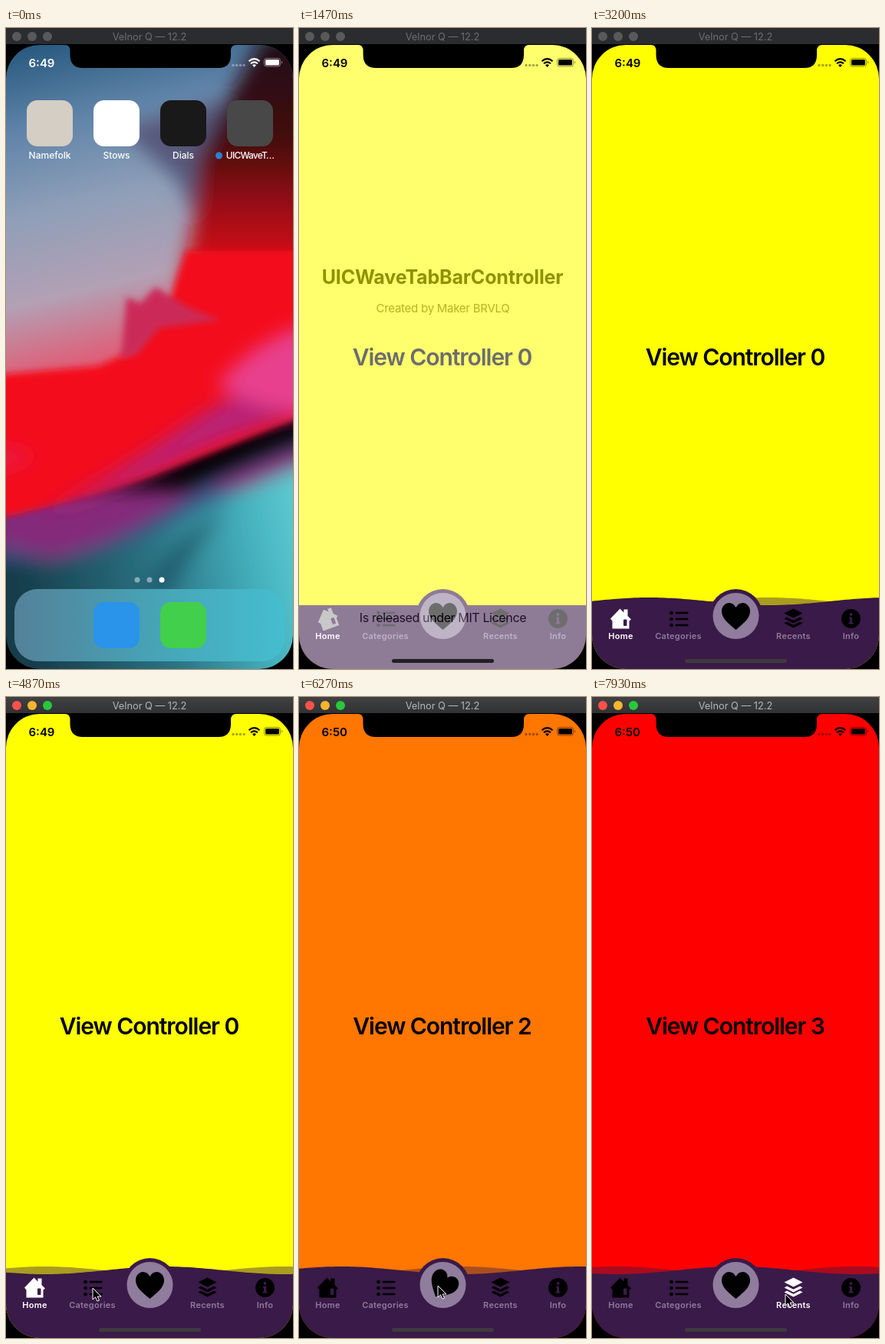
Recreate the animation shown at these times as an HTML page. Size 374x834 px, loop 8 s.

```html
<!DOCTYPE html>
<html lang="en">
<head>
<meta charset="utf-8">
<title>Wave tab bar</title>
<style>
html, body { margin: 0; width: 100%; height: 100%; overflow: hidden; background: #000; }
svg { display: block; width: 100%; height: 100%; }
text { font-family: Inter, "Open Sans", sans-serif; }
.mid { text-anchor: middle; }
.label { font-size: 12px; font-weight: 500; fill: #fff; }
.tab { font-size: 11px; font-weight: 600; letter-spacing: .25px; }
</style>
</head>
<body>
<svg viewBox="0 0 374 834">
  <defs>
    <clipPath id="screen"><path d="M0 66A44 44 0 0 1 44 22H77Q83.500 22 83.500 30V35Q83.500 52 100 52H277Q293 52 293 35V30Q293 22 300 22H330A44 44 0 0 1 374 66V790A44 44 0 0 1 330 834H44A44 44 0 0 1 0 790Z"/></clipPath>
    <clipPath id="window"><rect id="frame"/></clipPath>
    <filter id="soft" x="-20%" y="-20%" width="140%" height="140%"><feGaussianBlur stdDeviation="12"/></filter>
    <filter id="crisp" x="-20%" y="-20%" width="140%" height="140%"><feGaussianBlur stdDeviation="4"/></filter>
    <linearGradient id="sky" x2=".2" y2="1">
      <stop stop-color="#24567c"/><stop offset=".25" stop-color="#5f83a8"/><stop offset=".5" stop-color="#8f9fb8"/>
      <stop offset=".75" stop-color="#b3a0b4"/><stop offset="1" stop-color="#e8506a"/>
    </linearGradient>
    <linearGradient id="ridge" x2="0" y2="1">
      <stop stop-color="#1d0c16"/><stop offset=".4" stop-color="#43080f"/><stop offset=".7" stop-color="#a50a14"/><stop offset="1" stop-color="#f4101a"/>
    </linearGradient>
    <linearGradient id="sea" x2="1" y2="-.15">
      <stop stop-color="#163c4a"/><stop offset=".45" stop-color="#2c7686"/><stop offset=".75" stop-color="#46b4c0"/><stop offset="1" stop-color="#6cd6da"/>
    </linearGradient>
    <linearGradient id="dock"><stop stop-color="#54819a"/><stop offset=".5" stop-color="#46a3b5"/><stop offset="1" stop-color="#45bed0"/></linearGradient>
    <linearGradient id="lit" x2="0" y2="1"><stop stop-color="#404143"/><stop offset="1" stop-color="#313234"/></linearGradient>
  </defs>

  <rect id="bar" width="374" height="21"/>
  <g id="lights"><circle cx="14" cy="11" r="6"/><circle cx="34" cy="11" r="6"/><circle cx="54" cy="11" r="6"/></g>
  <text id="caption" class="mid" x="187" y="15.5" font-size="12.8">Velnor Q — 12.2</text>

  <g clip-path="url(#screen)">
    <g id="home">
      <rect y="22" width="374" height="440" fill="url(#sky)"/>
      <g filter="url(#soft)">
        <path d="M150 130L300 90L290 230L245 245L225 200Z" fill="#57587c"/>
        <path d="M400 10H335L285 100L250 170L245 250L225 345H400Z" fill="url(#ridge)"/>
        <path d="M-20 655Q120 650 230 600T400 530V860H-20Z" fill="#2f4f80"/>
        <path d="M-20 600H400V540Q300 570 220 620T60 690L-20 670Z" fill="#84297a"/>
        <path d="M-20 690Q90 705 190 655T400 565V860H-20Z" fill="url(#sea)"/>
        <path d="M290 625Q220 660 170 740H215Q240 680 290 625Z" fill="#235f72"/>
      </g>
      <g filter="url(#crisp)">
        <path d="M400 290L235 290L215 350L165 420L120 440L-20 452V640Q120 610 210 575T400 500Z" fill="#f3101a"/>
      </g>
      <g filter="url(#soft)">
        <path d="M400 500Q300 525 220 565T40 635Q130 590 230 520T400 460Z" fill="#b82277"/>
        <path d="M400 385Q330 400 275 465Q330 500 400 500Z" fill="#e8418d"/>
        <path d="M-20 545L45 555L-20 580Z" fill="#e81f48"/>
      </g>
      <path filter="url(#crisp)" d="M150 430L157 350L175 358L195 337L240 365L280 380L200 390L170 425Z" fill="#cb2b58"/>
      <g id="icons">
        <rect x="11" y="730" width="352" height="94" rx="30" fill="url(#dock)"/>
        <circle cx="171" cy="718" r="3.5" fill="#fff" opacity=".45"/>
        <circle cx="187" cy="718" r="3.5" fill="#fff" opacity=".45"/>
        <circle cx="203" cy="718" r="3.5" fill="#fff"/>
        <circle cx="277.500" cy="166" r="4.5" fill="#2d7fd2"/>
      </g>
    </g>

    <g id="app">
      <rect id="page" width="374" height="834"/>
      <text id="heading" class="mid" x="186.500" y="438.500" font-size="30" font-weight="600" letter-spacing="-1.05"></text>
      <path id="backWave" fill="#3a1a48" opacity=".43"/>
      <path id="frontWave" fill="#3a1a48"/>
      <circle cx="187.500" cy="765" r="35" fill="#3a1a48"/>
      <circle cx="187.500" cy="765" r="30" fill="#907c9c"/>
      <g id="tabs"></g>
      <rect x="121" y="821" width="133" height="5" rx="2.500" fill="#3d3a3e"/>
    </g>

    <g id="launch" clip-path="url(#window)">
      <g id="splash">
        <rect y="22" width="374" height="812" fill="#fff"/>
        <text class="mid" x="187" y="333" font-size="25" font-weight="700" letter-spacing="-.15">UICWaveTabBarController</text>
        <text class="mid" x="187.500" y="370.500" font-size="15" letter-spacing="-.25" fill="#555">Created by Maker BRVLQ</text>
        <text class="mid" x="187.500" y="773" font-size="16" letter-spacing="-.37">Is released under MIT Licence</text>
        <rect x="121" y="821" width="133" height="5" rx="2.500"/>
      </g>
    </g>

    <g id="status" fill="currentColor">
      <text id="clock" x="29.500" y="50.500" font-size="15" font-weight="600"></text>
      <g opacity=".35"><circle cx="296" cy="48.500" r="1.700"/><circle cx="300.700" cy="48.500" r="1.700"/><circle cx="305.400" cy="48.500" r="1.700"/><circle cx="310.100" cy="48.500" r="1.700"/></g>
      <g fill="none" stroke="currentColor" stroke-width="2.200"><path d="M316.500 43.200Q323.500 37 330.500 43.200"/><path d="M319 46.300Q323.500 42.300 328 46.300"/></g>
      <path d="M321 48.300Q323.500 46.300 326 48.300L323.500 51Z"/>
      <rect x="336.500" y="39.500" width="21" height="10.500" rx="3" fill="none" stroke="currentColor" opacity=".45"/>
      <rect x="338" y="41" width="18" height="7.500" rx="1.600"/>
      <path d="M359 43Q361.500 44.700 359 46.500Z" opacity=".5"/>
    </g>
  </g>
  <path id="cursor" d="M0 0V15L3.500 11.800L6 17.200L8.500 16L6.200 11H11Z" fill="#000" stroke="#fff" stroke-width="1"/>
</svg>

<script>
const LOOP = 8000, SPIN = 550, TAU = Math.PI * 2;
const $ = id => document.getElementById(id);
const set = (el, attrs) => { for (const k in attrs) el.setAttribute(k, attrs[k]); };
const clamp = v => Math.max(0, Math.min(1, v));
const smooth = v => { v = clamp(v); return v * v * (3 - 2 * v); };
const mix = (a, b, p) => a + (b - a) * p;

const tile = (x, y, fill) => `<rect x="${x - 30}" y="${y - 30}" width="60" height="60" rx="14" fill="${fill}"/>`;
const apps = [[57, 'Namefolk', '#d4cec4'], [144, 'Stows', '#fff'], [231, 'Dials', '#19191a'], [318, 'UICWaveT…', '#484848']];
$('icons').innerHTML += apps.map(([x, name, fill], i) => tile(x, 124, fill) +
  `<text class="mid label" x="${x}" y="170.300"${i === 3 ? ' letter-spacing="-.8"' : ''}>${name}</text>`).join('') +
  tile(144, 777, '#2a93ea') + tile(231, 777, '#42cf4c');

const rows = [-7.5, .5, 8.5].map(y => `<circle cx="-9" cy="${y}" r="2.300"/><rect x="-4" y="${y - 1.2}" width="17" height="2.400" rx="1"/>`).join('');
const layers = '<path d="M0 -13L12 -7L0 -1L-12 -7Z"/>' +
  [0, 6].map(y => `<path d="M-12 ${y}L-8.500 ${y - 2}L0 ${y + 2.2}L8.500 ${y - 2}L12 ${y}L0 ${y + 6}Z"/>`).join('');
const tabs = [
  { x: 37.5, name: 'Home', start: 1000, end: 5150, art: '<path d="M-13.500 0L-1 -13L4 -8V-12H9V-3.500L13.500 1L11 3V13H-11V3Z"/><rect x="3.500" y="1" width="4.500" height="8.500" rx="1" fill="#3a1a48"/>' },
  { x: 112.5, name: 'Categories', start: 5150, end: 6170, art: rows },
  { x: 187.5, y: 765, name: '', start: 6170, end: 7330, art: '<path d="M0 18C-8 11 -18.500 4 -18.500 -6C-18.500 -13 -13.500 -17 -9 -17C-5 -17 -2 -15 0 -11C2 -15 5 -17 9 -17C13.500 -17 18.500 -13 18.500 -6C18.500 4 8 11 0 18Z"/>' },
  { x: 262.5, name: 'Recents', start: 7330, end: LOOP, art: layers },
  { x: 337.5, name: 'Info', start: LOOP, end: LOOP, art: '<circle r="12.500"/><circle cy="-5.500" r="1.900" fill="#3a1a48"/><path d="M-2.500 -2H1.500V5H3V7H-3V5H-1.500V0H-2.500Z" fill="#3a1a48"/>' }
];
$('tabs').innerHTML = tabs.map(t => `<g>${t.art}</g><text class="mid tab" x="${t.x}" y="795">${t.name}</text>`).join('');
tabs.forEach((t, i) => { t.icon = $('tabs').children[i * 2]; t.text = $('tabs').children[i * 2 + 1]; });
const pageColors = ['#ff0', '#0f0', '#ff7600', '#f00'];

// time, x, y
const pointer = [[4730, 132, 742], [4870, 113, 769], [5550, 113, 769], [6000, 181, 766], [6750, 181, 766], [7250, 252, 777], [LOOP, 252, 777]];

function wave(t, sign) {
  const level = smooth((t - 1650) / 350) * 5, crest = 75 - (t - 3200) * .108;
  let d = 'M0 834';
  for (let x = 0; x <= 376; x += 4)
    d += `L${x} ${(751 - level - sign * level * Math.cos((x - crest) * TAU / 312)).toFixed(2)}`;
  return d + 'V834Z';
}

function drawLaunch(t) {
  const k = Math.max(0, t - 80) * .0142, p = 1 - (1 + k) * Math.exp(-k);
  const x = mix(288, 0, p), y = mix(94, 22, p), w = mix(60, 374, p), h = mix(60, 812, p);
  const s = w / 374, cx = x + w / 2, cy = y + h / 2, grow = w / 60;
  set($('frame'), { x, y, width: w, height: h, rx: mix(14, 44, p) });
  set($('splash'), { transform: `translate(${cx} ${cy}) scale(${s}) translate(-187 -428)` });
  set($('icons'), { transform: `translate(${cx} ${cy}) scale(${grow}) translate(-318 -124)`, opacity: 1 - clamp(p / .6) });
  set($('home'), { opacity: mix(1, .65, p) });
  set($('launch'), { opacity: t < 1270 ? clamp(p / .25) : 1 - clamp((t - 1270) / 350) });
  $('home').style.display = t < 1270 ? '' : 'none';
  $('app').style.display = t < 1270 ? 'none' : '';
  $('status').style.color = p < .4 ? '#fff' : '#000';
}

function drawApp(t) {
  const current = tabs.findIndex(tab => t < tab.end);
  set($('page'), { fill: pageColors[current] });
  $('heading').textContent = 'View Controller ' + current;
  set($('frontWave'), { d: wave(t, 1) });
  set($('backWave'), { d: wave(t, -1) });
  tabs.forEach((tab, i) => {
    const on = i === current, p = clamp((t - tab.start) / SPIN), shade = 255 * p ** 3;
    set(tab.icon, {
      transform: `translate(${tab.x} ${tab.y || 768.5}) rotate(${360 * smooth(p)})`,
      fill: on && tab.name ? `rgb(${shade},${shade},${shade})` : '#000'
    });
    set(tab.text, { fill: on ? '#fff' : '#8f7b9c' });
  });
}

function drawDesktop(t) {
  const active = t >= 4800;
  set($('bar'), { fill: active ? 'url(#lit)' : '#2b2c2f' });
  set($('caption'), { fill: active ? '#b5b5b6' : '#6d6d6f' });
  ['#ff5149', '#f5b52e', '#28c83e'].forEach((c, i) => set($('lights').children[i], { fill: active ? c : '#58595b' }));
  $('clock').textContent = t < 5600 ? '6:49' : '6:50';
  $('cursor').style.display = t < pointer[0][0] ? 'none' : '';
  const i = Math.max(1, pointer.findIndex(q => t < q[0]));
  const [a, b] = [pointer[i - 1], pointer[i]], p = smooth((t - a[0]) / (b[0] - a[0]));
  set($('cursor'), { transform: `translate(${mix(a[1], b[1], p)} ${mix(a[2], b[2], p)})` });
}

const origin = performance.now();
function tick() {
  const t = (performance.now() - origin) % LOOP;
  drawLaunch(t);
  drawApp(t);
  drawDesktop(t);
  requestAnimationFrame(tick);
}
tick();
</script>
</body>
</html>
```
